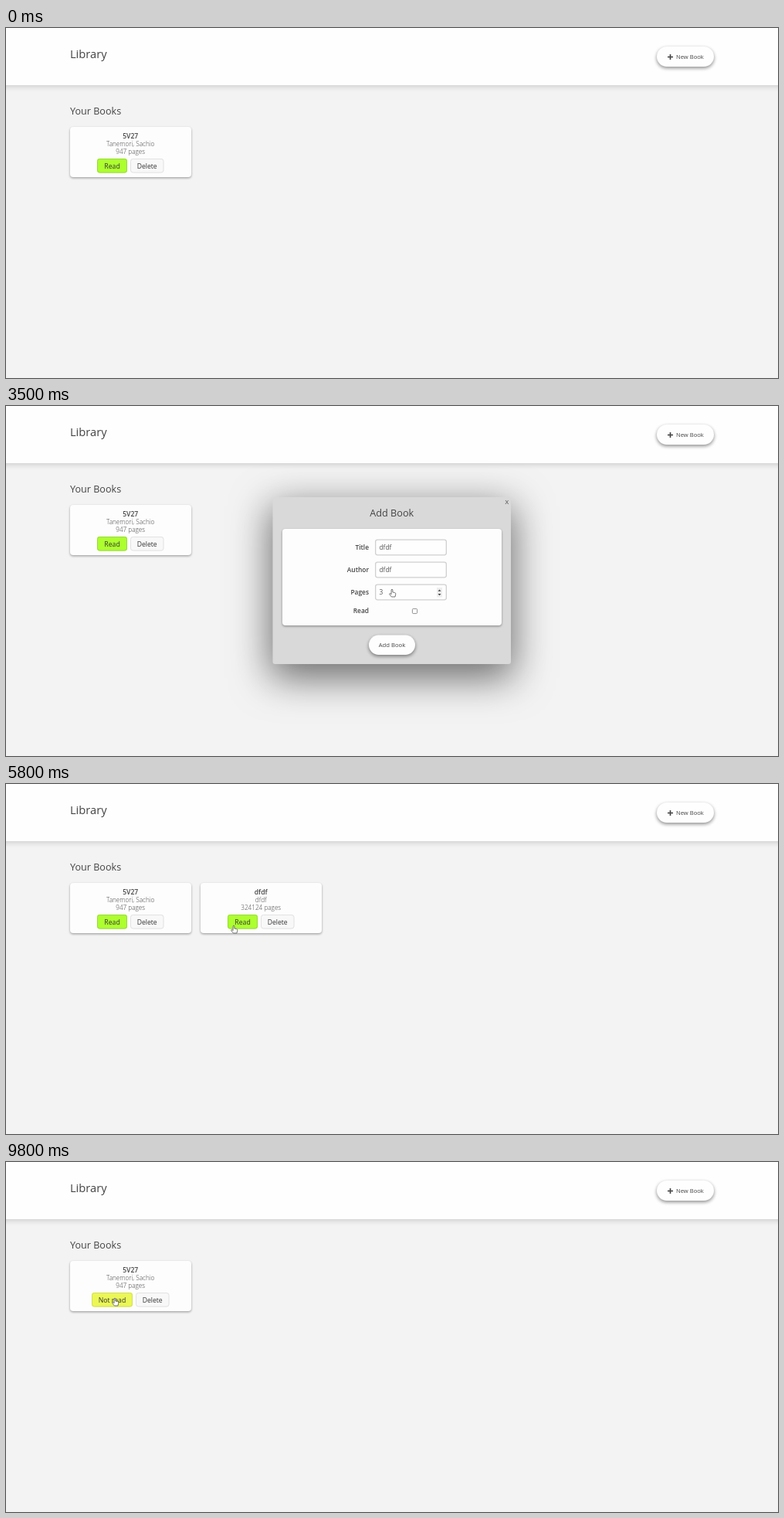
Write an HTML page with a canvas that moves like this. It is 1000x453 px and loops after 9.9 s.

```html
<!DOCTYPE html>
<html lang="en">
<head>
<meta charset="utf-8">
<title>Library</title>
<style>
  html, body { margin: 0; width: 100%; height: 100%; overflow: hidden; background: #f3f3f3; }
  canvas { display: block; width: 1000px; height: 453px; }
</style>
</head>
<body>
<canvas id="stage" width="1000" height="453"></canvas>
<script>
const ctx = document.getElementById('stage').getContext('2d');
const LOOP = 9900, STEP = 100;
const INK = '#444';
const MODAL = { open: 1000, close: 5300, duration: 200, cx: 500, cy: 226 };
const FIRST_TOGGLES = [8300, 8500, 8800, 9200, 9600];
const SECOND_TOGGLES = [6000, 6600];
const SECOND_DELETED = 7500;

// Pointer tip: time, x, y
const PATH = [
  [300, 700, 220], [700, 878, 39], [1300, 878, 39], [1900, 546, 196],
  [2400, 546, 196], [2500, 530, 212], [3000, 530, 212], [3100, 500, 237],
  [4000, 500, 237], [4400, 528, 264], [4800, 528, 264], [5100, 502, 315],
  [5500, 502, 315], [5800, 295, 183], [6700, 295, 183], [7200, 336, 185],
  [7500, 336, 185], [8100, 141, 176], [LOOP, 141, 176]
];

let zoom = 1;

const clamp = v => Math.max(0, Math.min(1, v));
const smooth = v => v * v * (3 - 2 * v);
const ramp = (t, start, duration) => smooth(clamp((t - start) / duration));
const within = (t, a, b) => t >= a && t < b;
const typed = (t, start, word) => word.slice(0, Math.max(0, Math.floor((t - start) / STEP) + 1));
const isRead = (t, toggles) => toggles.filter(time => t >= time).length % 2 === 0;

function pointerAt(t) {
  const i = PATH.findIndex(p => p[0] > t);
  const [t0, x0, y0] = PATH[i - 1], [t1, x1, y1] = PATH[i];
  const k = smooth((t - t0) / (t1 - t0));
  return { x: x0 + (x1 - x0) * k, y: y0 + (y1 - y0) * k };
}

function roundRect(x, y, w, h, r) {
  ctx.beginPath();
  ctx.roundRect(x, y, w, h, r);
}

function box(x, y, w, h, r, fill, border, line = 1) {
  roundRect(x, y, w, h, r);
  ctx.fillStyle = fill;
  ctx.fill();
  if (!border) return;
  roundRect(x + line / 2, y + line / 2, w - line, h - line, r);
  ctx.strokeStyle = border;
  ctx.lineWidth = line;
  ctx.stroke();
}

// Casts only the shadow; the shape itself stays off stage.
function shadow(x, y, w, h, r, dy, blur, alpha, spread = 0) {
  const away = 3000;
  ctx.save();
  ctx.shadowColor = `rgba(0,0,0,${alpha})`;
  ctx.shadowBlur = blur * zoom;
  ctx.shadowOffsetX = away;
  ctx.shadowOffsetY = dy * zoom;
  roundRect(x - spread - away / zoom, y - spread, w + 2 * spread, h + 2 * spread, r);
  ctx.fillStyle = '#000';
  ctx.fill();
  ctx.restore();
}

function text(str, x, y, size, weight = 500, align = 'left', color = INK) {
  ctx.font = `${weight} ${size}px "Open Sans", "Noto Sans", sans-serif`;
  ctx.textAlign = align;
  ctx.textBaseline = 'alphabetic';
  ctx.fillStyle = color;
  ctx.fillText(str, x, y);
}

function panel(x, y, w, h) {
  shadow(x, y, w, h, 4, 1, 3, 0.18);
  shadow(x, y, w, h, 4, 1.5, 3, 0.2);
  box(x, y, w, h, 4, '#fdfdfd');
}

function pill(x, y, w, h, hover) {
  const mix = (a, b) => Math.round(a + (b - a) * hover);
  shadow(x, y, w, h, h / 2, 2, 5, 0.2);
  shadow(x, y, w, h, h / 2, 2, 4, 0.28);
  box(x, y, w, h, h / 2, `rgb(${mix(254, 185)},${mix(254, 224)},${mix(254, 191)})`);
}

function page(t) {
  ctx.fillStyle = '#f3f3f3';
  ctx.fillRect(0, 0, 1000, 453);
  shadow(-10, -10, 1020, 84, 0, 2, 7, 0.16);
  ctx.fillStyle = '#fefefe';
  ctx.fillRect(0, 0, 1000, 74);
  text('Library', 83, 38.5, 14.7);
  pill(843, 24, 74, 26, ramp(t, 500, 200) * (1 - ramp(t, 1300, 200)));
  ctx.fillStyle = INK;
  ctx.fillRect(857, 36.7, 7, 1.6);
  ctx.fillRect(859.7, 34, 1.6, 7);
  text('New Book', 868, 40.2, 7.6);
  text('Your Books', 83, 112, 12.6);
}

function card(x, title, author, pages, read) {
  const mid = x + 78.2;
  panel(x, 128, 157, 65);
  text(title, mid, 142.5, 8.6, 600, 'center');
  text(author, mid, 153, 8.2, 300, 'center');
  text(`${pages} pages`, mid, 163.4, 8.2, 300, 'center');
  const width = read ? 39 : 53;
  const left = x + (read ? 35 : 28);
  box(left, 169, width, 18.5, 3, read ? '#adff2f' : '#ebf756', read ? '#98d83a' : '#d3dc5c');
  text(read ? 'Read' : 'Not read', left + width / 2, 181.6, 8.7, 500, 'center', '#333');
  box(left + width + 4, 169, 43.5, 18.5, 3, '#f8f8f8', '#e2e2e2');
  text('Delete', left + width + 25.7, 181.6, 8.6, 500, 'center', '#333');
}

function field(label, y, value, focused) {
  text(label, 470, y + 3, 8.4, 600, 'right');
  box(478, y - 10.5, 93, 21, 2.5, '#fefefe', '#d0d0d0', 1.3);
  text(value, 483.5, y + 3.2, 8.3, 400, 'left', '#555');
  if (!focused) return;
  ctx.fillStyle = '#222';
  ctx.fillRect(484 + ctx.measureText(value).width, y - 5, 1, 10);
}

function triangle(x, y, dy) {
  ctx.beginPath();
  ctx.moveTo(x - 2, y);
  ctx.lineTo(x + 2, y);
  ctx.lineTo(x, y + dy);
  ctx.fill();
}

function spinner() {
  box(558, 235, 7, 12.5, 0, '#eeeeee');
  ctx.fillStyle = '#444';
  triangle(561.5, 239.7, -2.3);
  triangle(561.5, 243, 2.3);
}

function checkbox(checked) {
  box(526, 262, 7, 7, 1.3, checked ? '#555' : '#fff', checked ? '#555' : '#777', 0.8);
  if (!checked) return;
  ctx.beginPath();
  ctx.moveTo(527.5, 265.6);
  ctx.lineTo(529, 267.1);
  ctx.lineTo(531.6, 263.8);
  ctx.strokeStyle = '#fff';
  ctx.lineWidth = 1.1;
  ctx.stroke();
}

function modal(t) {
  const { open, close, duration, cx, cy } = MODAL;
  zoom = ramp(t, open, duration) * (1 - ramp(t, close, duration));
  if (zoom > 0) {
    ctx.save();
    ctx.translate(cx, cy);
    ctx.scale(zoom, zoom);
    ctx.translate(-cx, -cy);
    shadow(345.5, 118, 308.5, 216, 3, 15, 50, 0.56, 3);
    box(345.5, 118, 308.5, 216, 3, '#d9d9d9');
    text('X', 648.7, 126.5, 8, 400, 'center');
    text('Add Book', 499.7, 143.3, 12.7, 500, 'center');
    panel(358, 159, 284, 125);
    field('Title', 183, typed(t, 2100, 'dfdf'), within(t, 1900, 2500));
    field('Author', 212, typed(t, 2700, 'dfdf'), within(t, 2500, 3100));
    field('Pages', 241, typed(t, 3500, '324124'), within(t, 3600, 4500));
    if (within(t, 3100, 4500)) spinner();
    text('Read', 470, 268.2, 8.4, 600, 'right');
    checkbox(t >= 4600);
    pill(470, 296.5, 60, 25.5, ramp(t, 4800, 200));
    text('Add Book', 500, 312.2, 7.7, 500, 'center');
    ctx.restore();
  }
  zoom = 1;
}

function pointer(t) {
  if (t < PATH[0][0]) return;
  const { x, y } = pointerAt(t);
  const hand = within(t, 600, 1400) || within(t, 1800, 5500) ||
    within(t, 5700, SECOND_DELETED) || t >= 8000;
  ctx.save();
  ctx.translate(x, y);
  const shape = hand
    ? new Path2D('M-.9 .8Q0 -.6 .9 .8V4L3.6 4.6Q5 5 4.8 6.3L4 10H-.6L-3.3 6.7Q-3.4 5.3-2.1 5.7L-.9 6.7Z')
    : new Path2D('M0 0V9L2.1 7.1L3.4 10L4.8 9.4L3.5 6.6H6.2Z');
  ctx.fillStyle = '#fff';
  ctx.fill(shape);
  ctx.strokeStyle = '#555';
  ctx.lineWidth = 0.8;
  ctx.lineJoin = 'round';
  ctx.stroke(shape);
  ctx.restore();
}

function draw(t) {
  page(t);
  card(83, '5V27', 'Tanemori, Sachio', 947, isRead(t, FIRST_TOGGLES));
  if (within(t, MODAL.close, SECOND_DELETED)) {
    card(252, 'dfdf', 'dfdf', 324124, isRead(t, SECOND_TOGGLES));
  }
  modal(t);
  pointer(t);
}

const begin = performance.now();
function tick() {
  const elapsed = (performance.now() - begin) % LOOP;
  draw(Math.floor(elapsed / STEP) * STEP);
  requestAnimationFrame(tick);
}
tick();
</script>
</body>
</html>
```
